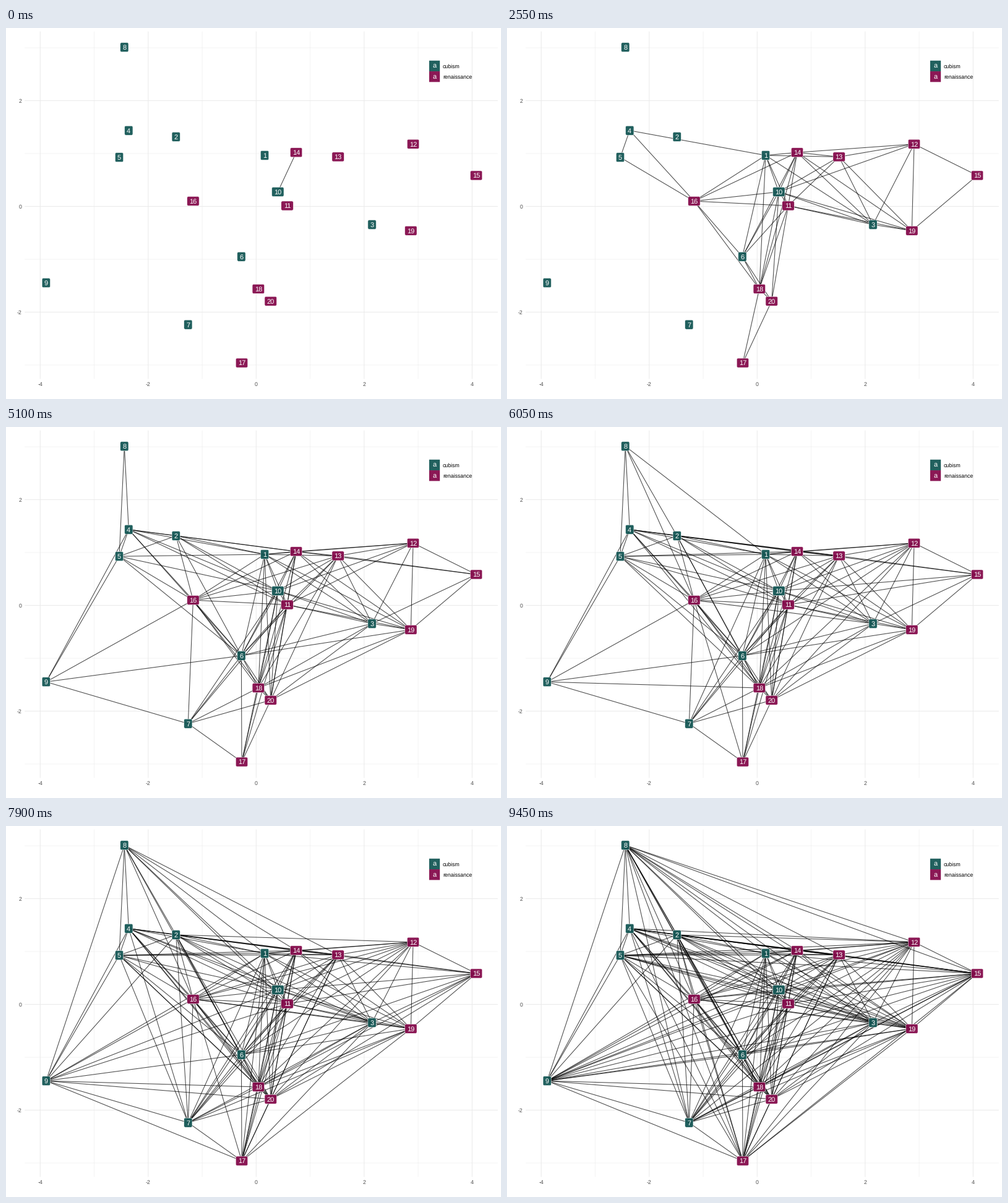
A matplotlib script that plays this animation: 800x600 px, repeating every 9500 ms.

```python
from itertools import combinations

import matplotlib.pyplot as plt
from matplotlib.animation import FuncAnimation
from matplotlib.collections import LineCollection
from matplotlib.colors import to_rgba
from matplotlib.patches import FancyBboxPatch, Rectangle

W, H, DPI = 800, 600, 72
TEAL, MAROON = to_rgba("#155755", 0.95), to_rgba("#850B4C", 0.95)
plt.rcParams["font.family"] = "Liberation Sans"
plt.rcParams["text.hinting"] = "none"

# Centre in pixels and spread outside the plotted plane (thousands of px^2).
# Nodes 1-10 are cubism, 11-20 renaissance.
NODES = {
    1: (418, 206, 13), 2: (274.7, 176, 62), 3: (591.5, 318, 28),
    4: (198.3, 165.8, 18), 5: (183, 209.2, 42), 6: (380.4, 369.8, 20),
    7: (294.3, 479.7, 55), 8: (191.3, 31.2, 50), 9: (64.8, 412.2, 12),
    10: (439.3, 265, 10), 11: (454.5, 287.5, 16), 12: (658, 187.7, 17),
    13: (536.6, 208.4, 14), 14: (469, 201.3, 10), 15: (760, 238.5, 28),
    16: (302.4, 280, 22), 17: (381, 541.6, 40), 18: (407.8, 422, 18),
    19: (654.3, 327.8, 20), 20: (427.7, 441.8, 22),
}


def full_distance(pair):
    """Squared distance in the plane plus the spread of both nodes."""
    (xa, ya, sa), (xb, yb, sb) = (NODES[n] for n in pair)
    return ((xa - xb) ** 2 + (ya - yb) ** 2) / 1000 + sa + sb


fig = plt.figure(figsize=(W / DPI, H / DPI), dpi=DPI, facecolor="white")
ax = fig.add_axes([0, 0, 1, 1])
ax.set_xlim(0, W)
ax.set_ylim(H, 0)
ax.axis("off")


def px(x):
    return 404.3 + 87.25 * x


def py(y):
    return 288.5 - 85.5 * y


def write(x, y, text, size, color, ha="center", z=2):
    ax.text(x, y + 0.35 * size, text, fontsize=size, color=color, ha=ha,
            va="baseline", zorder=z)


def draw_grid():
    left, right, top, bottom = 30.2, 794.7, 5.7, 567.5
    for v in range(-4, 5):
        major = v % 2 == 0
        style = dict(color="#EBEBEB", lw=1.07 if major else 0.53, zorder=0,
                     snap=False, solid_capstyle="butt")
        ax.plot([px(v)] * 2, [top, bottom], **style)
        if major:
            write(px(v), 575.8, str(v), 8.8, "#4D4D4D")
        if abs(v) <= 3:
            ax.plot([left, right], [py(v)] * 2, **style)
            if major:
                write(25.4, py(v), str(v), 8.8, "#4D4D4D", ha="right")


def draw_label(n):
    x, y, _ = NODES[n]
    w, h = 6.13 * len(str(n)) + 7.2, 15.1
    z = 3 + n / 10
    ax.add_patch(FancyBboxPatch(
        (x - w / 2, y - h / 2), w, h,
        boxstyle="round,pad=0,rounding_size=2.16", lw=0.53, edgecolor="white",
        facecolor=TEAL if n <= 10 else MAROON, snap=False, zorder=z))
    write(x, y, str(n), 11, "white", z=z + 0.05)


def draw_legend():
    key = 17.28
    for i, (name, color) in enumerate([("cubism", TEAL), ("renaissance", MAROON)]):
        mid = 61.4 + key * i
        ax.add_patch(Rectangle((683.9, mid - key / 2), key, key, lw=0,
                               facecolor=color, snap=False, zorder=2))
        write(692.5, mid, "a", 11, "white", z=3)
        write(706, mid, name, 8.8, "black", ha="left")


draw_grid()
draw_legend()
for n in NODES:
    draw_label(n)

# One link per frame, from the closest pair to the most distant.
pairs = sorted(combinations(NODES, 2), key=full_distance)
segments = [[NODES[n][:2] for n in pair] for pair in pairs]
links = LineCollection([], colors=[(0, 0, 0, 0.7)], linewidths=1.07,
                       capstyle="butt", zorder=1)
ax.add_collection(links, autolim=False)


def update(frame):
    links.set_segments(segments[:frame + 1])
    return [links]


anim = FuncAnimation(fig, update, frames=len(segments), interval=50,
                     repeat=True, repeat_delay=0)
plt.show()
```
